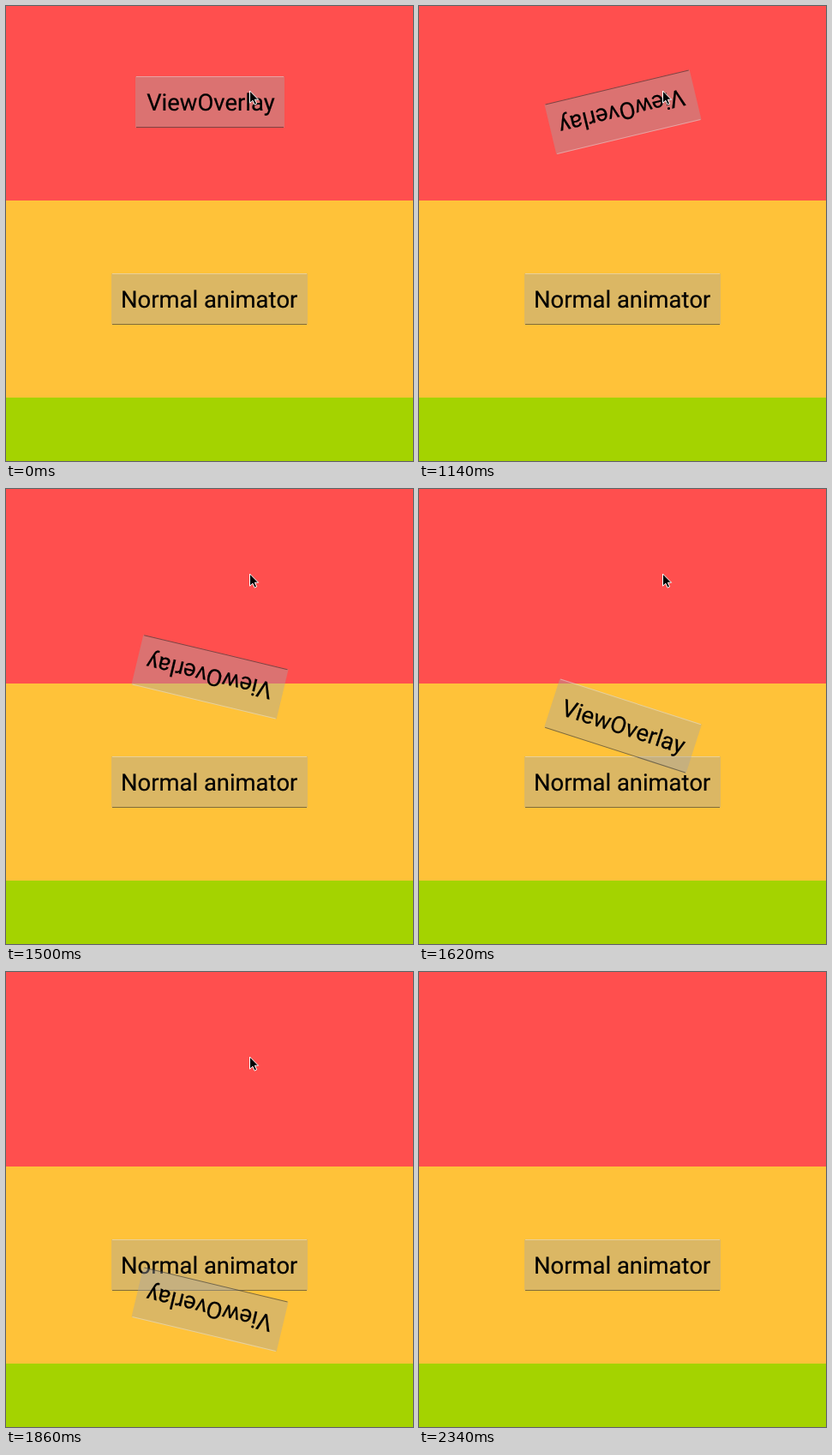
An HTML page for the animation above (3620 ms loop, 475x531 px).

```html
<!DOCTYPE html>
<html lang="en">
<head>
<meta charset="utf-8">
<title>Overlay animation</title>
<style>
  html, body { margin: 0; width: 100%; height: 100%; overflow: hidden; }
  svg { display: block; width: 475px; height: 531px; }
  text {
    font: 27.4px Roboto, Arial, sans-serif; font-kerning: none;
    text-anchor: middle; text-rendering: geometricPrecision;
    stroke: #000; stroke-width: .2px;
  }
  .face { fill: #a5a5a5; fill-opacity: .4; }
  .light { fill: #fff; fill-opacity: .35; }
  .dark { fill: #000; fill-opacity: .42; }
</style>
</head>
<body>
<svg viewBox="0 0 475 531">
  <rect width="475" height="531" fill="#a4d300"/>
  <rect width="475" height="457" fill="#ffc239"/>
  <rect width="475" height="227" fill="#ff4f4e"/>
  <g transform="translate(237.5 342)">
    <rect class="face" x="-114.5" y="-30" width="229" height="60" rx="1"/>
    <rect class="light" x="-113.5" y="-30" width="227" height="1"/>
    <rect class="dark" x="-113.5" y="29" width="227" height="1"/>
    <text x="-.3" y="10">Normal animator</text>
  </g>
  <g id="button">
    <g id="normal">
      <rect class="face" x="-87" y="-30" width="174" height="60" rx="1"/>
      <rect class="light" x="-86" y="-30" width="172" height="1"/>
      <rect class="dark" x="-86" y="29" width="172" height="1"/>
    </g>
    <g id="pressed">
      <rect x="-93" y="-36" width="186" height="72" rx="4" fill="#33b5e5" fill-opacity=".4"/>
      <rect x="-88" y="-31" width="176" height="62" rx="1" fill="#a5a5a5" fill-opacity=".4"/>
      <rect x="-87" y="-30" width="175" height="60" fill="#59b0d9"/>
      <rect class="dark" x="-87" y="29.5" width="175" height="1"/>
    </g>
    <text x="1" y="10">ViewOverlay</text>
  </g>
  <path id="cursor" d="M.5 0V14.2L3.9 11.2L6.1 16.2L8.6 15L6.4 10.2H10.6Z"
        fill="#000" stroke="#fff" stroke-width="1"/>
</svg>
<script>
  const LOOP = 3620, STEP = 60, TICK = 1000 / 60;
  const PRESS = 840, RELEASE = 1020, START = 967;
  const FALL_TIME = 2000, FALL_DISTANCE = 689, SPIN_TIME = 350;
  const EXIT_START = 2040, EXIT_END = 2340;

  const [button, normal, pressed, cursor] =
    ['button', 'normal', 'pressed', 'cursor'].map(id => document.getElementById(id));
  const show = (node, on) => node.setAttribute('display', on ? 'inline' : 'none');
  const place = (node, x, y, angle = 0) =>
    node.setAttribute('transform', `translate(${x} ${y}) rotate(${angle})`);
  const floorTo = (value, unit) => Math.floor(value / unit) * unit;
  const easeInOut = p => (1 - Math.cos(Math.PI * p)) / 2;

  function render(time) {
    const t = floorTo(time % LOOP, STEP);
    // The button moves on a 60 Hz clock that is sampled at each step.
    const elapsed = t < RELEASE ? 0 : floorTo(t - START, TICK);

    // The cosine easing also reverses the spin on every second turn.
    place(button, 238, 112 + FALL_DISTANCE * easeInOut(Math.min(1, elapsed / FALL_TIME)),
      360 * easeInOut(elapsed / SPIN_TIME));
    show(button, t < EXIT_END);

    const isPressed = t >= PRESS && t < RELEASE;
    show(pressed, isPressed);
    show(normal, !isPressed);

    const exit = Math.max(0, (t - EXIT_START) / (EXIT_END - EXIT_START));
    place(cursor, 284 + 195 * exit ** 1.5, 99 + 12 * exit);
    show(cursor, t < EXIT_END);
  }

  const origin = performance.now();
  function tick() {
    render(performance.now() - origin);
    requestAnimationFrame(tick);
  }
  tick();
</script>
</body>
</html>
```
